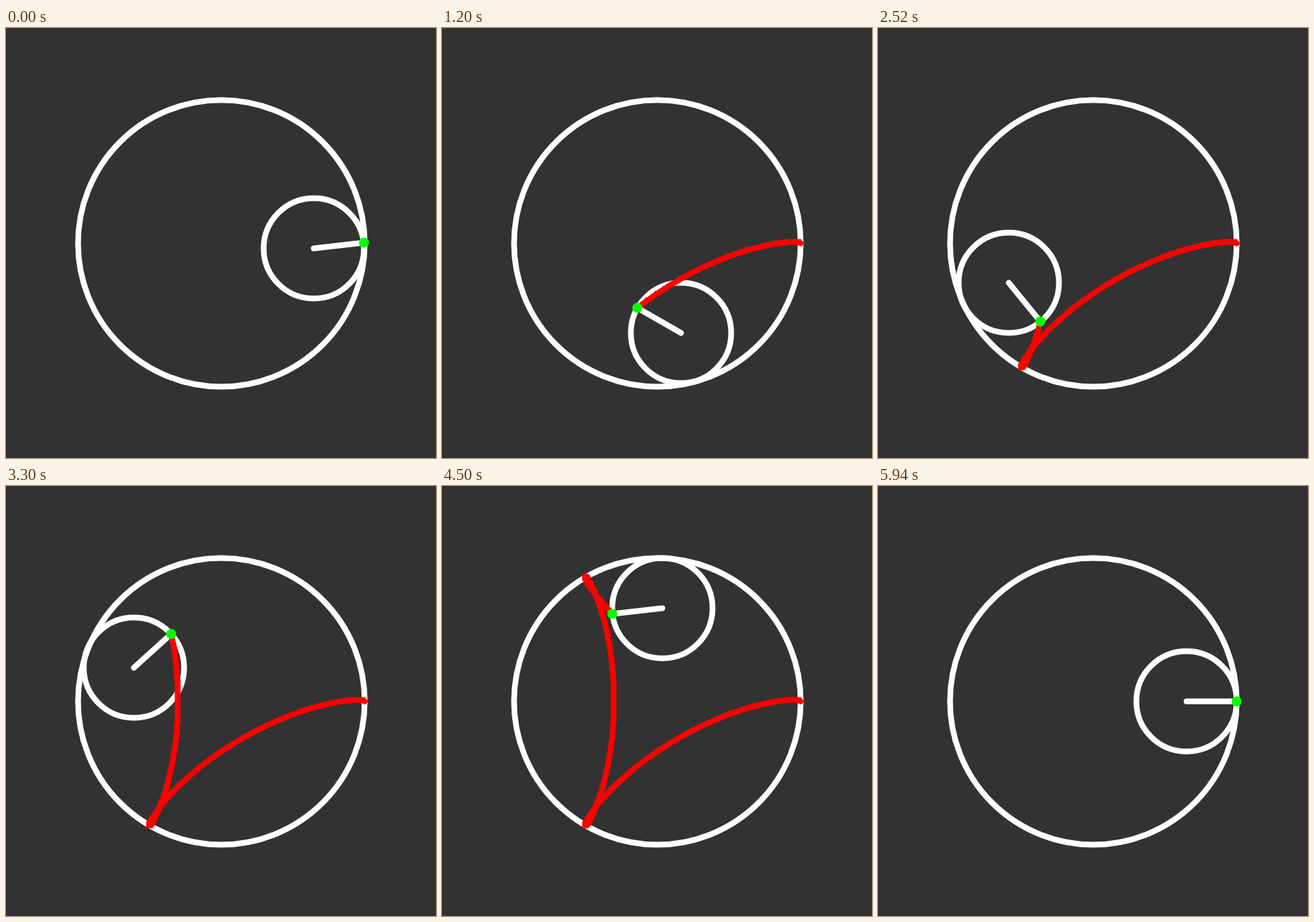
These frames come from a looping animation (600x600 px, 6000 ms). An HTML page with a canvas:

```html
<!DOCTYPE html>
<html lang="en">
<head>
<meta charset="utf-8">
<title>Rolling circle</title>
<style>
  html, body { margin: 0; width: 100%; height: 100%; overflow: hidden; background: #323232; }
  canvas { display: block; width: 600px; height: 600px; }
</style>
</head>
<body>
<canvas id="stage" width="600" height="600"></canvas>
<script>
const ctx = document.getElementById('stage').getContext('2d');
const MID = 300, OUTER = 200, INNER = 70, ARM = OUTER - INNER;
const TICK = 60, TICKS = 100, STEPS = 628;

// Positions snap to whole pixels and are drawn at pixel centres.
const snap = v => Math.floor(MID + v) + 0.5;

const hub = a => [snap(ARM * Math.cos(a)), snap(ARM * Math.sin(a))];

const pen = a => [
  snap(ARM * Math.cos(a) + INNER * Math.cos(2 * a)),
  snap(ARM * Math.sin(a) - INNER * Math.sin(2 * a))
];

const trail = Array.from({ length: STEPS }, (_, i) => pen(i / 100));

function ring(x, y, r) {
  ctx.beginPath();
  ctx.arc(x, y, r, 0, 2 * Math.PI);
}

function strokeLine(points, color) {
  ctx.strokeStyle = color;
  ctx.beginPath();
  points.forEach(p => ctx.lineTo(...p));
  ctx.stroke();
}

function draw(step) {
  const [x, y] = hub(step / 100);
  const tip = trail[step];

  ctx.fillStyle = '#323232';
  ctx.fillRect(0, 0, 600, 600);

  ctx.lineWidth = 8;
  ctx.lineCap = 'round';
  ctx.lineJoin = 'miter';
  ctx.strokeStyle = '#fff';
  ring(MID + 0.5, MID + 0.5, OUTER);
  ctx.stroke();
  ring(x, y, INNER);
  ctx.stroke();

  strokeLine([[x, y], tip], '#fff');
  if (step > 0) strokeLine(trail.slice(0, step + 1), '#f00');

  ctx.fillStyle = '#0f0';
  ring(...tip, 7);
  ctx.fill();
}

const start = performance.now();
let shown = -1;

function loop() {
  const tick = Math.floor((performance.now() - start) / TICK) % TICKS;
  if (tick !== shown) {
    shown = tick;
    draw(Math.floor((tick + 1) * STEPS / TICKS) % STEPS);
  }
  requestAnimationFrame(loop);
}
loop();
</script>
</body>
</html>
```
